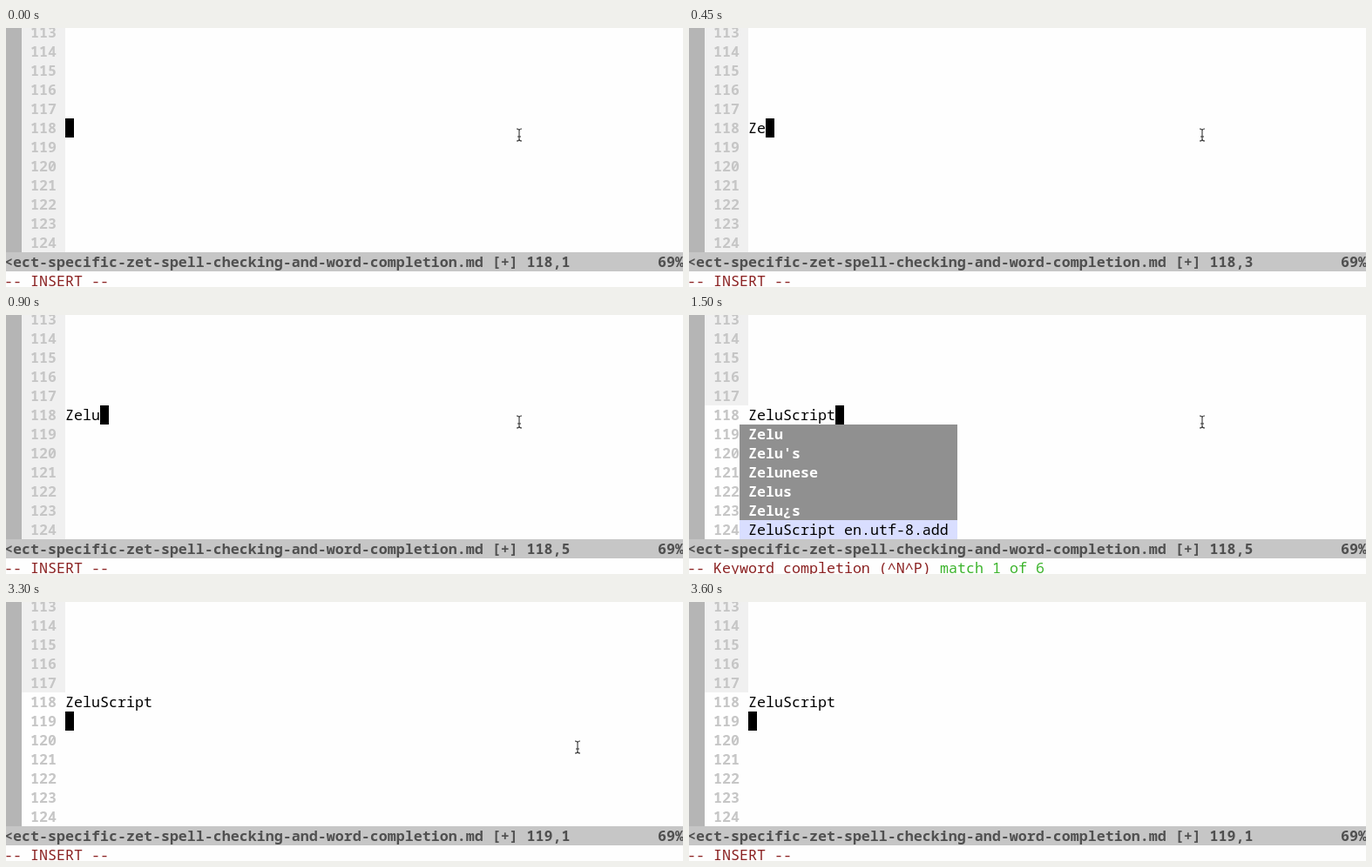
Recreate the animation shown at these times as an HTML page. Size 777x298 px, loop 4630 ms.

```html
<!DOCTYPE html>
<html lang="en">
<head>
<meta charset="utf-8">
<title>Word completion in a text editor</title>
<style>
  html, body { margin: 0; width: 100%; height: 100%; overflow: hidden; background: #fefefe; }
  svg { display: block; }
  text { font: 16.667px "Noto Sans Mono", "DejaVu Sans Mono", monospace; white-space: pre; }
  .bold { font-weight: 600; }
</style>
</head>
<body>
<svg id="screen" width="777" height="298" viewBox="0 0 777 298"></svg>
<script>
const screen = document.getElementById("screen");
const LOOP = 4630, CELL = 10, ROW = 22, FIRST = 113;
const WORD = "ZeluScript";
const KEYS = [300, 450, 750, 900];
const MENU_OPEN = 1500, MENU_CLOSE = 2550;
const MENU = ["Zelu", "Zelu's", "Zelunese", "Zelus", "Zelu¿s", WORD + " en.utf-8.add"];
const FILE = "<ect-specific-zet-spell-checking-and-word-completion.md [+] ";
const POINTER = [[0, 589, 123], [3300, 656, 167], [3450, 696.5, 190], [3600]];

const colX = col => col * CELL - 2;
const rowY = row => row * ROW - 6;
const rect = (x, y, w, h, fill) =>
  `<rect x="${x}" y="${y}" width="${w}" height="${h}" fill="${fill}"/>`;
const text = (col, row, str, fill, cls = "") =>
  `<text x="${colX(col)}" y="${rowY(row) + 17}" fill="${fill}" class="${cls}">${str.replace(/</g, "&lt;")}</text>`;

function gutter(t) {
  let out = rect(0, 0, 18, 258, "#b5b5b5") +
    rect(18, 0, 50, t < MENU_OPEN ? 258 : 104, "#f0f0f0");
  for (let row = 0; row < 12; row++) out += text(3, row, String(FIRST + row), "#c6c6c6", "bold");
  return out;
}

function menu() {
  return rect(58, rowY(6), 250, 5 * ROW, "#909090") +
    rect(58, rowY(11), 250, ROW, "#d9deff") +
    MENU.map((item, i) => {
      const chosen = i === MENU.length - 1;
      return text(7, 6 + i, item, chosen ? "#000" : "#fff", chosen ? "" : "bold");
    }).join("");
}

function pointer(t) {
  const [, x, y] = POINTER.filter(p => p[0] <= t).pop();
  if (x === undefined) return "";
  const d = "M-3-7Q0-7 0-5Q0-7 3-7M0-5V5M-3 7Q0 7 0 5Q0 7 3 7M-2 2H2";
  return `<path transform="translate(${x} ${y})" d="${d}" fill="none" stroke="#333" stroke-width="1.1"/>`;
}

function draw(t) {
  const typed = KEYS.filter(k => k <= t).length;
  const open = t >= MENU_OPEN && t < MENU_CLOSE;
  const done = t >= MENU_CLOSE;
  const line = WORD.slice(0, t < MENU_OPEN ? typed : WORD.length);
  const place = done ? "119,1" : `118,${typed + 1}`;
  const cursorCol = 7 + (done ? 0 : line.length);
  return gutter(t) +
    text(7, 5, line, "#000") +
    rect(colX(cursorCol), rowY(done ? 6 : 5), CELL, ROW, "#000") +
    (open ? menu() : "") +
    rect(0, rowY(12), 777, ROW, "#c6c6c6") +
    text(0, 12, FILE + place, "#505050", "bold") +
    text(75, 12, "69%", "#505050", "bold") +
    text(0, 13, open ? "-- Keyword completion (^N^P)" : "-- INSERT --", "#8b2222") +
    (open ? text(29, 13, "match 1 of 6", "#3cb42c") : "") +
    pointer(t);
}

let shown = "";
function tick() {
  const next = draw(performance.now() % LOOP);
  if (next !== shown) screen.innerHTML = shown = next;
  requestAnimationFrame(tick);
}
tick();
</script>
</body>
</html>
```
